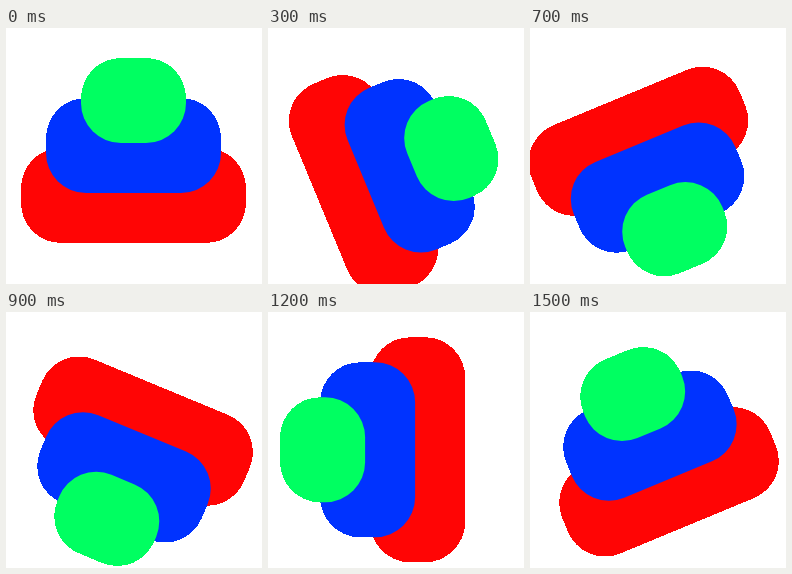
Animation, 256 px wide and 256 px high, one loop 1600 ms. Source, as an HTML page without scripts:

```html
<!DOCTYPE html>
<html lang="en">
<head>
<meta charset="utf-8">
<title>Tumbling stack</title>
<style>
  @property --turn { syntax: "<angle>"; inherits: true; initial-value: 0deg; }

  html, body { margin: 0; width: 100%; height: 100%; overflow: hidden; background: #fff; }
  svg { display: block; width: 100vw; height: 100vh; }

  /* The stack spins while its pivot drifts on small circles at -3, 5 and -7 times the turn. */
  .stack {
    --wide: calc(3 * var(--turn) + 45deg);
    --small: calc(5 * var(--turn) + 45deg);
    --tiny: calc(7 * var(--turn));
    --x: calc(123.7px + 4.655px * cos(var(--wide)) + 0.408px * cos(var(--small)) + 0.219px * cos(var(--tiny)));
    --y: calc(141.6px - 4.655px * sin(var(--wide)) + 0.408px * sin(var(--small)) - 0.219px * sin(var(--tiny)));
    transform: translate(var(--x), var(--y)) rotate(var(--turn)) translateY(-1.095px);
    animation: turn 1.6s steps(16) infinite;
  }
  @keyframes turn { to { --turn: 360deg; } }
</style>
</head>
<body>
<svg viewBox="0 0 256 256">
  <!-- Hard outline, smooth edges where the blocks overlap. -->
  <filter id="hard-outline" filterUnits="userSpaceOnUse" x="0" y="0" width="256" height="256" color-interpolation-filters="sRGB">
    <feComponentTransfer><feFuncA type="discrete" tableValues="0 1"/></feComponentTransfer>
  </filter>
  <g filter="url(#hard-outline)">
    <g class="stack">
      <rect x="-112.5" y="-17.5" width="225" height="95" rx="40" fill="#ff0505"/>
      <rect x="-87.5" y="-67.5" width="175" height="95" rx="40" fill="#03f"/>
      <rect x="-52.5" y="-107.5" width="105" height="85" rx="40" fill="#00ff61"/>
    </g>
  </g>
</svg>
</body>
</html>
```
